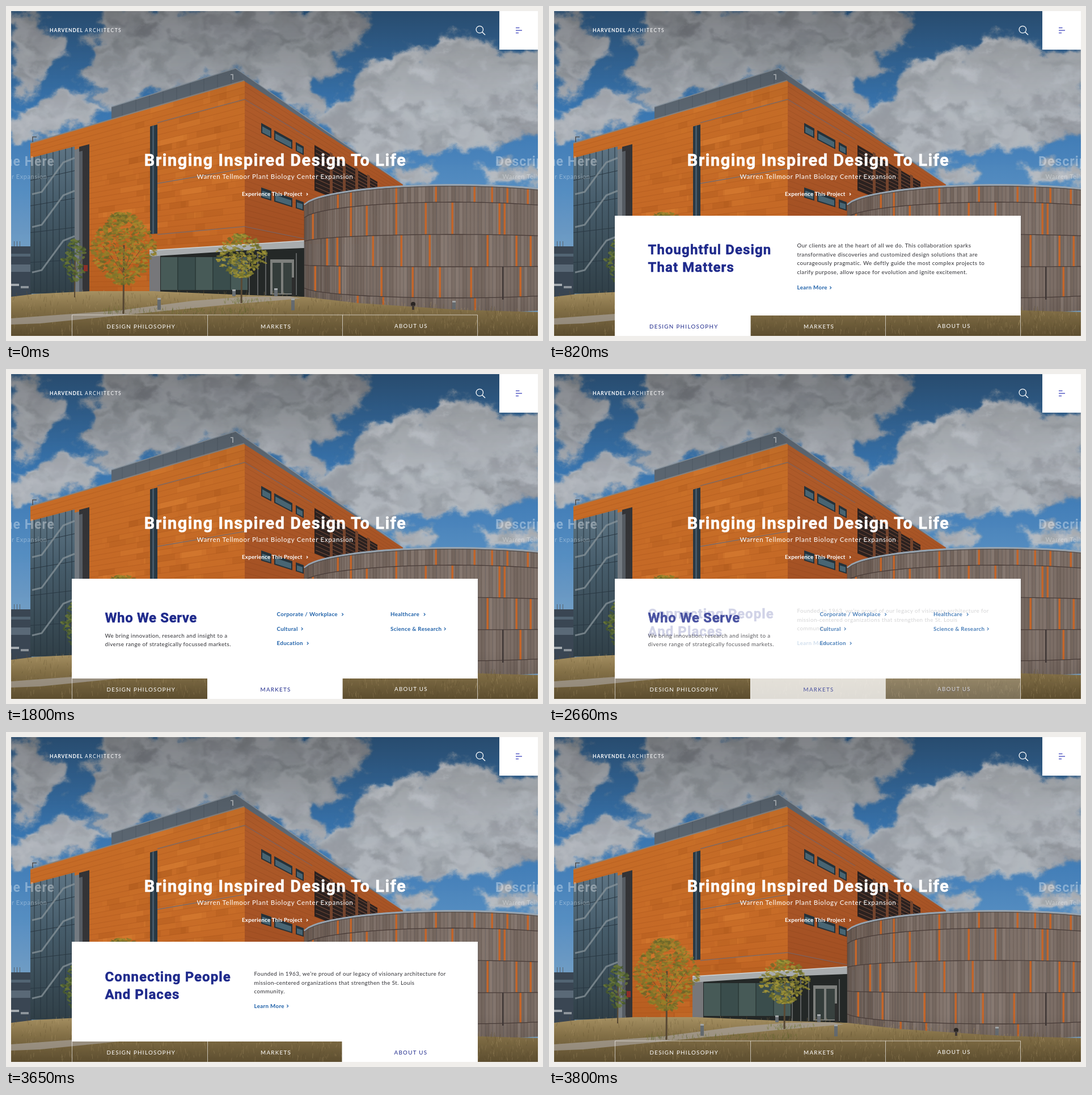
An HTML page for the animation above (4940 ms loop, 947 px wide and 591 px high).

```html
<!DOCTYPE html>
<html lang="en">
<head>
<meta charset="utf-8">
<title>Architecture studio home page</title>
<style>
html, body { margin: 0; width: 100%; height: 100%; overflow: hidden; background: #f0eeeb; }
svg { position: absolute; left: 0; top: 0; width: 947px; height: 591px; display: block; }
#ui { will-change: transform; }
.body { font-family: Lato, sans-serif; }
.head { font-family: Roboto, sans-serif; font-weight: 700; }
</style>
</head>
<body>
<svg id="photo" viewBox="0 0 947 591"></svg>
<svg id="ui" viewBox="0 0 947 591"></svg>
<script>
const LOOP = 4940, NAVY = '#1f2a8c', LINK = '#1f61a9';

let seed = 11;
const rnd = (a = 0, b = 1) => {
  seed = (seed * 16807) % 2147483647;
  return a + (b - a) * seed / 2147483647;
};
const pick = list => list[Math.floor(rnd() * list.length)];
const num = v => v.toFixed(1);
const grey = v => `rgb(${v | 0},${(v + 1) | 0},${(v + 4) | 0})`;

const poly = (pts, fill, more = '') => `<polygon points="${pts}" fill="${fill}" ${more}/>`;
const line = (pts, stroke, w = 1, more = '') =>
  `<polyline points="${pts}" fill="none" stroke="${stroke}" stroke-width="${w}" ${more}/>`;
const rect = (x, y, w, h, fill, more = '') =>
  `<rect x="${x}" y="${y}" width="${w}" height="${h}" fill="${fill}" ${more}/>`;
const oval = (x, y, rx, ry, fill, more = '') =>
  `<ellipse cx="${num(x)}" cy="${num(y)}" rx="${num(rx)}" ry="${num(ry)}" fill="${fill}" ${more}/>`;

// ---------- photo ----------

// Each cloud: mean grey, how much lighter its top is than its foot, outline.
const clouds = [
  [168, 10, '9,14 45,12 72,45 100,62 108,85 85,110 60,118 45,158 9,160'],
  [162, -42, '170,3 625,3 645,40 615,70 570,85 602,110 570,128 540,118 560,185 530,195 480,160 440,135 405,108 190,178 150,145 125,125 160,100 140,70 165,45'],
  [176, 62, '545,205 560,175 620,150 622,112 690,75 740,82 770,52 830,55 880,80 945,75 945,225 880,235 830,255 760,262 700,258 680,290 640,275'],
  [172, 0, '9,185 60,175 100,150 150,155 185,180 120,215 60,228 9,240'],
  [178, 0, '690,280 750,285 740,312 690,315'],
  [178, 0, '835,290 870,275 945,285 945,310 850,308']
];

function sky() {
  let clips = '', puffs = '';
  clouds.forEach(([mean, lift, c], i) => {
    const p = c.split(' ').map(s => s.split(',').map(Number));
    const xs = p.map(q => q[0]), ys = p.map(q => q[1]);
    const x0 = Math.min(...xs), x1 = Math.max(...xs), y0 = Math.min(...ys), y1 = Math.max(...ys);
    clips += `<clipPath id="c${i}">${poly(c, '#000')}</clipPath>`;
    let inner = poly(c, grey(mean + 14));
    const n = (x1 - x0) * (y1 - y0) / 280;
    for (let k = 0; k < n; k++) {
      const v = rnd();
      inner += oval(rnd(x0, x1), y0 + v * (y1 - y0), rnd(9, 24), rnd(5, 12),
        grey(mean + lift * (.5 - v) + rnd(-28, 32)), 'opacity=".55"');
    }
    puffs += `<g clip-path="url(#c${i})">${inner}</g>`;
  });
  return clips + rect(9, 9, 929, 573, 'url(#sky)') + `<g filter="url(#fluff)" opacity=".94">${puffs}</g>`;
}

// Facade points: v runs from the roof line (0) to the ground (1).
const roofL = x => 242 - (x - 43) * .2937;
const roofR = x => 131 + (x - 421) * .66;
const at = (roof, x, v) => `${x},${num(roof(x) + (505 - roof(x)) * v)}`;
const quad = (roof, x0, x1, v0, v1, fill, more) =>
  poly([at(roof, x0, v0), at(roof, x1, v0), at(roof, x1, v1), at(roof, x0, v1)].join(' '), fill, more);
const seam = (roof, x0, x1, v, stroke, w, more) =>
  line(at(roof, x0, v) + ' ' + at(roof, x1, v), stroke, w, more);

function building() {
  let s = '';
  // neighbour on the left
  s += rect(9, 424, 36, 90, '#3a4653') + rect(9, 437, 36, 5, '#526473') + rect(9, 456, 34, 13, '#5a6977');
  s += rect(9, 490, 14, 4, '#a5abb0') + rect(26, 494, 14, 4, '#8d949b');
  for (const x of [14, 19, 24]) s += rect(x, 415, 1, 9, '#59636d');

  // roof
  s += poly('186,178 405,110 421,131 186,201', '#5c6772');
  s += line('186,178 405,110', '#86919b', 1.5);
  for (let x = 205; x < 400; x += 24) s += line(`${x},${num(173 - (x - 205) * .31)} ${x},${num(194 - (x - 205) * .29)}`, '#4d5762', .7);

  // long facade
  s += quad(roofL, 43, 421, 0, 1, 'url(#clay)');
  for (let k = 0; k < 150; k++) {
    const x = Math.round(rnd(147, 400)), v = Math.floor(rnd(0, 32)) / 32;
    s += quad(roofL, x, Math.min(421, x + Math.round(rnd(14, 55))), v, v + 1 / 32, pick(['#e08636', '#a9541a', '#d0752d']), 'opacity=".24"');
  }
  for (let v = 1 / 32; v < 1; v += 1 / 32) s += seam(roofL, 43, 421, v, '#8a4216', .6, 'opacity=".38"');
  for (const v of [.09, .416, .69]) s += seam(roofL, 267, 421, v, '#7b6c6c', 1.3);
  s += quad(roofL, 254, 267, .1, .685, '#2a3944') + quad(roofL, 258, 261, .1, .685, '#465a69');

  // stair glass
  s += quad(roofL, 43, 121, .1, 1.01, 'url(#glass)');
  for (let x = 50; x < 121; x += 11) s += line(at(roofL, x, .1) + ' ' + at(roofL, x, 1), '#26343f', 1);
  for (const v of [.25, .42, .6, .8]) s += seam(roofL, 43, 121, v, '#2a3843', 1);
  for (const y of [0, 58, 138]) s += line(`46,${y + 332} 63,${y + 328} 101,${y + 276} 121,${y + 268}`, '#8d999f', 3, 'opacity=".7"');
  s += quad(roofL, 121, 129, .12, 1.01, '#747b82') + quad(roofL, 129, 147, .11, 1.01, '#343437') + quad(roofL, 129, 135, .14, 1.01, '#565c63');

  // short facade
  s += poly('421,131 700,315 700,420 421,420', 'url(#clayDark)');
  for (let v = 1 / 36; v < .8; v += 1 / 36) s += seam(roofR, 421, 700, v, '#713716', .6, 'opacity=".35"');
  for (const v of [.09, .69]) s += seam(roofR, 421, 540, v, '#7b6260', 1.1);
  for (const [a, b] of [[450, 468], [473, 505], [511, 525]])
    for (const v of [.158, .479]) {
      s += quad(roofR, a, b, v, v + .05, '#24323b') + quad(roofR, a + 2, b - 2, v + .014, v + .044, '#496674');
    }
  s += quad(roofR, 544, 655, .113, .386, '#2b211f');
  for (let v = .13; v < .38; v += .026) s += seam(roofR, 546, 655, v, '#6b4535', 1.2);
  for (const x of [571, 594, 616, 637]) s += quad(roofR, x, x + 5, .1, .39, '#75452d');
  s += line('43,242 421,131', '#8a8480', 2);
  s += poly('405,110 695,311 704,317 421,133', '#5f6a76') + line('405,110 695,311', '#8b96a0', 1.4);
  s += line('400,130 400,121 396,121', '#bcc2c6', 1.5) + line('47,240 47,231 54,231', '#4b4f54', 1.6);

  // entrance
  s += poly('253,438 421,424 526,424 526,514 253,508', '#242827');
  s += rect(253, 440, 19, 66, '#77777a') + rect(273, 443, 126, 58, '#2f3e3d');
  for (let x = 273; x < 400; x += 31) s += rect(x, 443, 29, 58, pick(['#3a4d4c', '#475a57', '#33464a']));
  s += rect(466, 447, 42, 62, '#7d7f7c') + rect(470, 453, 15, 54, '#343d3b') + rect(489, 453, 15, 54, '#38413f');
  for (const x of [428, 443, 457, 511]) s += rect(x, 436, 2, 74, '#5d6060');
  s += poly('253,431 526,414 526,427 421,431 253,442', '#a9adaf') + line('253,431 526,414', '#d2d5d6', 1.5);
  return s;
}

// Height on the drum of a ring that sits at y in its middle.
const ring = (y, x) => {
  const u = (x - 790) / 266;
  return y + (40 - (y - 316) * .3) * (1 - Math.sqrt(Math.max(0, 1 - u * u)));
};

function drum() {
  const rows = [316, 346, 403, 460, 515, 542];
  const accents = [
    [585, 608, 688, 758, 826, 857, 884, 920],
    [541, 608, 636, 688, 740, 787, 870, 879],
    [566, 584, 647, 697, 747, 849, 900, 925],
    [545, 588, 662, 717, 765, 820, 907],
    [620, 665, 827]
  ];
  const strip = (a, b, r, fill) => poly([
    [a, ring(rows[r], a)], [b, ring(rows[r], b)], [b, ring(rows[r + 1], b)], [a, ring(rows[r + 1], a)]
  ].map(p => p.map(num).join()).join(' '), fill);
  let s = '';
  for (let r = 0; r < 5; r++) {
    for (let q = .08; q < 2.17; q += .025) {
      const x = Math.max(526, 790 - 266 * Math.cos(q)), x2 = 790 - 266 * Math.cos(q + .025);
      if (x2 < 526) continue;
      const l = rnd(-11, 11) + (x < 590 ? (x - 590) * .15 : 6);
      s += strip(x, x2 + .4, r, `rgb(${(120 + l) | 0},${(106 + l) | 0},${(98 + l) | 0})`);
      s += line(`${num(x)},${num(ring(rows[r], x))} ${num(x)},${num(ring(rows[r + 1], x))}`, '#4b3f3b', .7, 'opacity=".5"');
    }
    for (const x of accents[r]) s += strip(x - 1.5, x + 2, r, '#c4662a');
  }
  const trace = y => {
    const p = [];
    for (let x = 526; x <= 938; x += 8) p.push(x + ',' + num(ring(y, x)));
    return p.join(' ') + ' 938,' + num(ring(y, 938));
  };
  for (const y of rows.slice(1, 5)) s += line(trace(y), '#4a3d39', 1.3);
  s += line(trace(315.5), '#98a6b3', 3) + line(trace(318), '#55504f', 1.2);
  return s + rect(875, 460, 2.5, 58, '#403836');
}

function ground() {
  let s = poly('9,513 50,508 150,503 260,503 400,509 526,513 620,524 800,536 938,540 938,582 9,582', 'url(#grass)');
  const blade = (x, y, h, c) => line(`${num(x)},${num(y)} ${num(x + rnd(-2, 2))},${num(y - h)}`, c, .9, 'opacity=".45"');
  const tones = ['#bda472', '#74633c', '#a89063', '#665633', '#957f52'];
  for (let k = 0; k < 1100; k++) {
    const x = rnd(9, 938), top = x < 526 ? 508 : 513 + (x - 526) * .075;
    s += blade(x, rnd(top, 582), rnd(3, 10), pick(tones));
  }
  s += poly('9,551 200,537 330,520 420,513 500,512 520,516 400,526 290,537 150,551 60,560 9,562', '#a99e8d');
  for (let k = 0; k < 200; k++) s += blade(rnd(170, 440), rnd(535, 546), rnd(2, 7), pick(['#66702e', '#7d7a34', '#4e5a26']));
  for (let k = 0; k < 60; k++) s += blade(rnd(385, 470), rnd(518, 527), rnd(3, 6), pick(['#7d8133', '#5d6a2b']));
  for (const [x, y, h] of [[267, 515, 21], [503, 516, 21], [787, 520, 15], [473, 498, 14], [399, 500, 12]])
    s += rect(x, y, 6, h, '#6a7075') + rect(x, y, 6, 3, '#a7abad');
  return s + oval(718, 526, 4, 4, '#2c2725') + rect(716, 528, 4, 8, '#463e39') + rect(504, 479, 6, 32, '#2d2d2d');
}

function tree(x, top, foot, w, h, n, tones) {
  let s = line(`${x},${foot} ${x + 1},${top + h * .45}`, '#5a4a35', w > 50 ? 3 : 2);
  for (let k = -2; k < 3; k++) s += line(`${x},${top + h * .85} ${num(x + k * w * .16)},${num(top + h * .45)}`, '#5a4a35', .9);
  for (let k = 0; k < n; k++) {
    const v = rnd(), half = w / 2 * Math.sin(Math.PI * (.08 + .84 * v));
    const lx = x + rnd(-half, half), ly = top + h * v;
    s += oval(lx, ly, rnd(2, 5), rnd(1, 2.4), pick(tones), `opacity=".75" transform="rotate(${rnd(-40, 40) | 0} ${num(lx)} ${num(ly)})"`);
  }
  return s;
}

const grad = (id, ...stops) => `<linearGradient id="${id}" x1="0" y1="0" x2="0" y2="1">` +
  stops.map(([o, c, a = 1]) => `<stop offset="${o}" stop-color="${c}" stop-opacity="${a}"/>`).join('') + '</linearGradient>';

document.getElementById('photo').innerHTML = `<defs>
  ${grad('sky', [0, '#356492'], [.3, '#3a78b4'], [.55, '#568fc4'], [.8, '#7ca4c6'])}
  ${grad('clay', [0, '#c96f28'], [.6, '#c76a26'], [1, '#b65d20'])}
  ${grad('clayDark', [0, '#b55f2c'], [1, '#a24f22'])}
  ${grad('glass', [0, '#5f7686'], [.4, '#465c6a'], [1, '#303f47'])}
  ${grad('grass', [0, '#a89263'], [.4, '#8d784c'], [1, '#6e5c38'])}
  ${grad('shade', [0, '#000', .24], [.3, '#000', .02], [.85, '#000', 0], [1, '#000', .16])}
  <clipPath id="frame"><rect x="9" y="9" width="929" height="573"/></clipPath>
  <filter id="fluff" x="0" y="0" width="947" height="340" filterUnits="userSpaceOnUse" color-interpolation-filters="sRGB">
    <feTurbulence type="fractalNoise" baseFrequency=".026 .032" numOctaves="5" seed="4" result="n"/>
    <feGaussianBlur in="SourceGraphic" stdDeviation="4" result="b"/>
    <feDisplacementMap in="b" in2="n" scale="50" xChannelSelector="R" yChannelSelector="G"/>
  </filter></defs>
  <g clip-path="url(#frame)">
    ${sky()}${building()}${drum()}${ground()}
    ${tree(121, 412, 514, 44, 74, 110, ['#5d7030', '#6b7836', '#47582a'])}
    ${tree(207, 365, 543, 114, 126, 720, ['#94802a', '#7f762b', '#a5892f', '#6a672a', '#8a7a2c'])}
    ${tree(415, 402, 524, 90, 76, 300, ['#958b33', '#7f7c2e', '#a89a3a', '#6a6b2c'])}
    ${rect(137, 457, 7, 11, '#8d2f27')}${rect(9, 9, 929, 573, 'url(#shade)')}
  </g>`;

// ---------- interface ----------

const text = (cls, x, y, size, gap, fill, str, more = '') =>
  `<text class="${cls}" x="${x}" y="${y}" font-size="${size}" letter-spacing="${gap}" fill="${fill}" ${more}>${str}</text>`;
const thick = color => `stroke="${color}" stroke-width=".5"`;
const title = (x, y, str, gap = 1.08) => text('head', x, y, 24, gap, NAVY, str, thick(NAVY));
const copy = (x, y, rows) => rows.map((r, i) => text('body', x, y + i * 15.5, 9.8, .43, '#2e2e33', r)).join('');
const arrow = (x, y, color, r = 2.3) => line(`${x - r / 2},${y - r} ${x + r / 2},${y} ${x - r / 2},${y + r}`, color, 1.2);
const link = (x, y, str, ax) => text('body', x, y, 9.8, .33, LINK, str, 'font-weight="700"') + arrow(ax, y - 3, LINK);

const pages = [
  title(174.5, 438, 'Thoughtful Design') + title(174.5, 469, 'That Matters') +
  copy(437.5, 426, [
    'Our clients are at the heart of all we do. This collaboration sparks',
    'transformative discoveries and customized design solutions that are',
    'courageously pragmatic. We deftly guide the most complex projects to',
    'clarify purpose, allow space for evolution and ignite excitement.'
  ]) + link(437.5, 500, 'Learn More', 496.5),

  title(174.5, 447, 'Who We Serve', .6) +
  copy(174.5, 473.5, ['We bring innovation, research and insight to a', 'diverse range of strategically focussed markets.']) +
  link(477.5, 436, 'Corporate / Workplace', 593.5) + link(477.5, 461.5, 'Cultural', 522) +
  link(477.5, 487, 'Education', 532) + link(678, 436, 'Healthcare', 738) +
  link(678, 461.5, 'Science &amp; Research', 774),

  title(174.5, 440, 'Connecting People') + title(174.5, 471, 'And Places') +
  copy(437.5, 430, [
    'Founded in 1963, we’re proud of our legacy of visionary architecture for',
    'mission-centered organizations that strengthen the St. Louis',
    'community.'
  ]) + link(437.5, 486.5, 'Learn More', 496.5)
];

const tabs = [
  { x: 116, w: 239, tx: 177, y: 568.5, name: 'DESIGN PHILOSOPHY' },
  { x: 355, w: 238, tx: 448.5, y: 568.5, name: 'MARKETS' },
  { x: 592.5, w: 239.5, tx: 684.5, y: 567.7, name: 'ABOUT US' }
];
const ghost = (cls, x, y, size, gap, str, more = '') => text(cls, x, y, size, gap, '#fff', str, `opacity=".34" ${more}`);

document.getElementById('ui').innerHTML = `
  <clipPath id="stage"><rect x="9" y="9" width="929" height="573"/></clipPath>
  <g clip-path="url(#stage)">
    ${text('body', 77, 46, 8.5, .9, '#fff', 'HARVENDEL', 'font-weight="700"')}
    ${text('body', 139, 46, 8.5, 1.45, '#fff', 'ARCHITECTS')}
    <circle cx="835.3" cy="41.5" r="6.2" fill="none" stroke="#fff" stroke-width="1.3"/>
    ${line('839.8,46 845,51', '#fff', 1.4)}
    ${rect(870, 9, 68, 68, '#fff')}
    ${line('899,38.5 905.5,38.5', '#4a50c0', 1.4)}${line('899,43 910,43', '#4a50c0', 1.4)}${line('899,47.5 904,47.5', '#4a50c0', 1.4)}
    ${ghost('head', 86, 282, 23, 1, 'Headline Here', 'text-anchor="end"')}
    ${ghost('body', 72.5, 305, 11, .6, 'Center Expansion', 'text-anchor="end"')}
    ${ghost('head', 863, 282, 23, 1, 'Description Here')}
    ${ghost('body', 875.5, 305, 11, .6, 'Warren Tellmoor')}
    ${text('head', 475, 282, 29, 1.5, '#fff', 'Bringing Inspired Design To Life', 'text-anchor="middle" ' + thick('#fff'))}
    ${text('body', 474.5, 305.3, 11.5, .69, '#fff', 'Warren Tellmoor Plant Biology Center Expansion', 'text-anchor="middle"')}
    ${text('body', 416, 335, 9.8, .2, '#fff', 'Experience This Project', 'font-weight="700"')}${arrow(531, 332, '#fff', 2)}
    <g fill="none" stroke="#fff" stroke-opacity=".62"><path d="M116.5 583V545H831.5V583M355.5 545V583M593.5 545V583"/></g>
    ${rect(116, 370, 716, 176, '#fff', 'id="panel"')}
    ${tabs.map((t, i) => rect(t.x, 545.5, t.w, 37, '#fff', `id="fill${i}"`) +
      text('body', t.tx + .5, t.y, 9.8, 1.3, '#fff', t.name, `id="off${i}"`) +
      text('body', t.tx, 568.5, 9.8, 1.3, NAVY, t.name, `id="on${i}"`)).join('')}
    ${pages.map((p, i) => `<g id="page${i}">${p}</g>`).join('')}
  </g>`;

const clamp = v => Math.max(0, Math.min(1, v));
const fade = (t, start) => clamp((Math.floor((t - start) / 30) + 1) / 5);
const show = (id, a) => document.getElementById(id).setAttribute('opacity', a.toFixed(3));

function draw(t) {
  const open = fade(t, 700), second = fade(t, 1680), third = fade(t, 2660), shut = fade(t, 3680);
  show('panel', open * (1 - shut));
  [open * (1 - second), second * (1 - third), third * (1 - shut)].forEach((a, i) => {
    show('page' + i, a);
    show('fill' + i, a);
    show('on' + i, a);
    show('off' + i, 1 - a);
  });
}

const start = performance.now();
function tick() {
  draw((performance.now() - start) % LOOP);
  requestAnimationFrame(tick);
}
tick();
</script>
</body>
</html>
```
